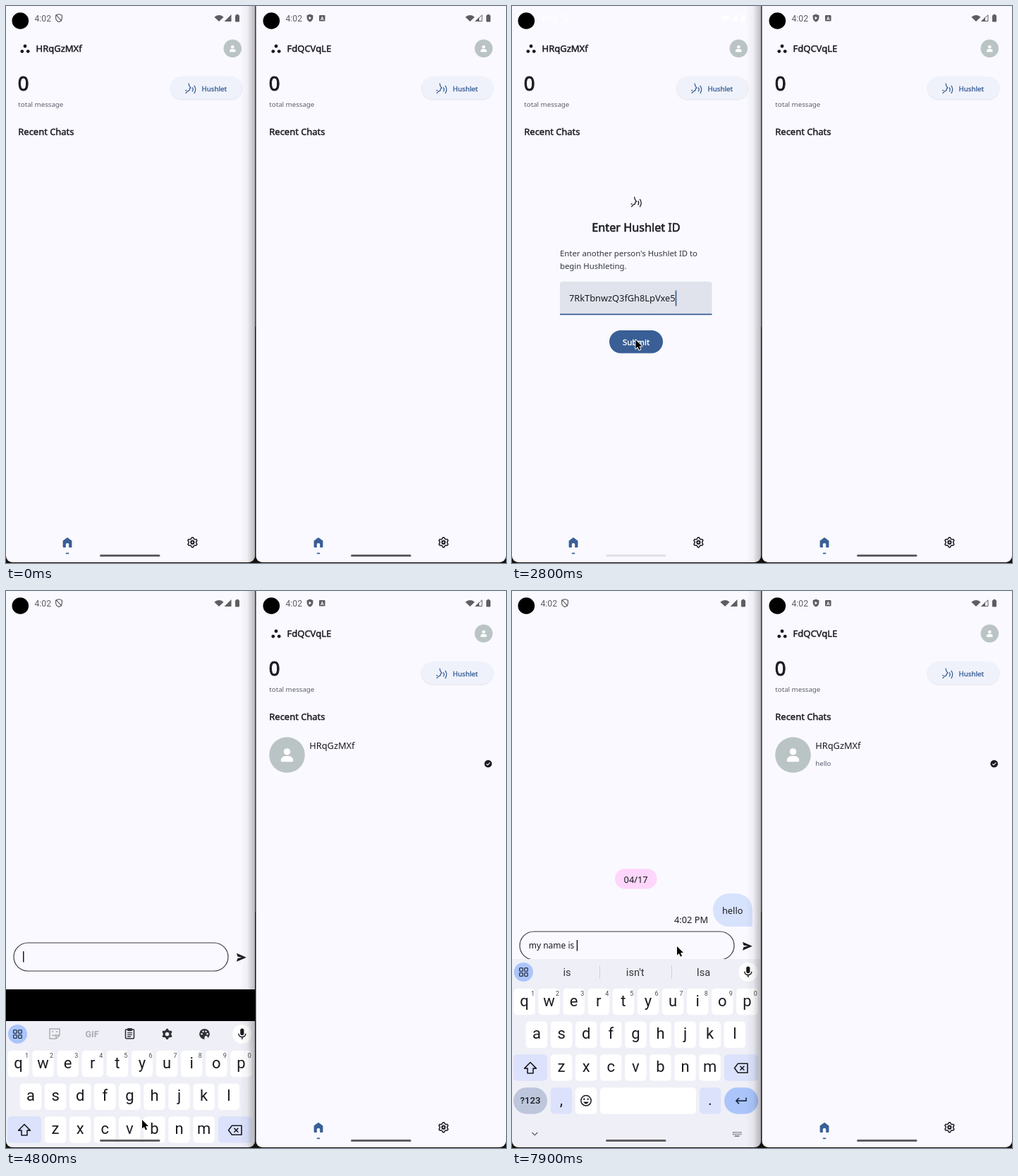
Animation of 709x790 px, one loop 8000 ms. Source, as an HTML page with a canvas:

```html
<!DOCTYPE html>
<html lang="en">
<head>
<meta charset="utf-8">
<title>Two phones chatting</title>
<style>
  html, body { margin: 0; width: 100%; height: 100%; overflow: hidden; background: #15110c; }
  canvas { display: block; width: 709px; height: 790px; }
</style>
</head>
<body>
<canvas id="stage"></canvas>
<script>
const W = 709, H = 790, LOOP = 8000, TICK = 100, RIGHT = 356;
const PAGE = '#f9f9ff', INK = '#1a1b20', BLUE = '#395f96', GREY = '#5c5e6b';
const ACCENT = '#abc5fb', SOFT = '#dce2fb', KEYS_BG = '#efeff7', STATUS = '#5e5e62';
const NOTO = '"Noto Sans", sans-serif', ROBOTO = 'Roboto, sans-serif';
const LEFT_ID = 'HRqGzMXf', RIGHT_ID = 'FdQCVqLE', APP = 'Hushlet';
const KB_TOP = 522, KB_H = H - KB_TOP;

const canvas = document.getElementById('stage');
const c = canvas.getContext('2d');
const dpr = window.devicePixelRatio || 1;
canvas.width = W * dpr;
canvas.height = H * dpr;

// Drawing helpers; "medium" thickens the regular weight with a thin outline
function text(s, x, y, size, { color = INK, weight = 400, font = NOTO, align = 'left', medium = false } = {}) {
  c.font = `${weight} ${size}px ${font}`;
  c.fillStyle = color;
  c.textAlign = align;
  c.fillText(s, x, y);
  if (medium) {
    c.strokeStyle = color;
    c.lineWidth = size * 0.035;
    c.strokeText(s, x, y);
  }
}
function box(x, y, w, h, r, color) {
  c.beginPath();
  c.roundRect(x, y, w, h, r);
  c.fillStyle = color;
  c.fill();
}
function frame(x, y, w, h, r, color, width = 1.2) {
  c.beginPath();
  c.roundRect(x, y, w, h, r);
  line(color, width);
}
function disc(x, y, r, color) {
  c.beginPath();
  c.arc(x, y, r, 0, Math.PI * 2);
  c.fillStyle = color;
  c.fill();
}
function ring(x, y, r, color, width = 1.4) {
  c.beginPath();
  c.arc(x, y, r, 0, Math.PI * 2);
  line(color, width);
}
function line(color, width) {
  c.strokeStyle = color;
  c.lineWidth = width;
  c.stroke();
}
function at(x, y, scale, draw) {
  c.save();
  c.translate(x, y);
  c.scale(scale, scale);
  draw();
  c.restore();
}
function shape(d, x, y, color, { scale = 1, width = 0 } = {}) {
  at(x, y, scale, () => {
    const p = new Path2D(d);
    if (width) {
      c.strokeStyle = color;
      c.lineWidth = width;
      c.stroke(p);
    } else {
      c.fillStyle = color;
      c.fill(p, 'evenodd');
    }
  });
}

// Icons
function gear(x, y, r, color, filled) {
  c.beginPath();
  for (let i = 0; i < 24; i++) {
    const a = (i - 1.5) * Math.PI / 12 - Math.PI / 2;
    const q = i % 4 === 1 || i % 4 === 2 ? r : r * 0.76;
    c.lineTo(x + q * Math.cos(a), y + q * Math.sin(a));
  }
  c.closePath();
  if (filled) {
    c.fillStyle = color;
    c.fill();
    disc(x, y, r * 0.36, KEYS_BG);
  } else {
    line(color, 1.5);
    ring(x, y, r * 0.3, color, 2);
  }
}
function person(x, y, r, s) {
  disc(x, y, r, '#bac4c4');
  disc(x, y - 4.6 * s, 4.7 * s, '#fff');
  box(x - 8.8 * s, y + 1.4 * s, 17.6 * s, 8.4 * s, [8 * s, 8 * s, 2 * s, 2 * s], '#fff');
}
function voice(x, y, color) {
  shape('M-2.8 -7.3C-1.6 -6.4 -2.4 -4.6 -1.5 -3.4L.6 -.7L-1.2 .3C-1.4 2.4 -1 3.8 -3.4 3.7C-5.6 3.6 -4.6 6.4 -7 6.7M-7.3 3.2L-5.6 2.4M2.6 -1.5Q4.8 1.4 2.6 4.4M5.2 -4.2Q9.4 1.4 5.2 7',
    x, y, color, { width: 1.3 });
}
function status(dx, color) {
  disc(20.3 + dx, 21, 11.8, '#000');
  text('4:02', 40.5 + dx, 21.5, 12.2, { color, font: ROBOTO });
  const shield = 'M0 -5.5L4.4 -3.7V-.4C4.4 2.6 2.5 4.8 0 5.6C-2.5 4.8 -4.4 2.6 -4.4 -.4V-3.7Z';
  if (dx) {
    shape(shield + 'M-1.4 -2.3V2.5L2.2 .1Z', 431, 17, color);
    box(444, 13, 8.5, 8.5, 1, color);
    text('A', 448.3, 20, 7, { color: PAGE, weight: 700, font: ROBOTO, align: 'center' });
  } else {
    shape(shield + 'M-4.2 -4.6L4 4.4', 75, 17, color, { width: 1.2 });
  }
  c.beginPath();
  c.moveTo(302 + dx, 22);
  c.arc(302 + dx, 22, 9, -Math.PI * 0.76, -Math.PI * 0.24);
  c.fillStyle = color;
  c.fill();
  if (dx) {
    shape('M1 9.5H10V.8Z', 665, 12, color, { width: 1 });
    shape('M0 10H6V4Z', 665, 12, color);
  } else {
    shape('M0 10H10V0Z', 309.5, 12, color);
  }
  box(325 + dx, 13, 6, 9.4, 1, color);
  box(326.5 + dx, 11.8, 3, 2, 0, color);
}

// Screens
function home(dx, own, peer, preview) {
  for (const [x, y] of [[27, 57], [22.8, 64.3], [31.2, 64.3]]) disc(x + dx, y, 2.4, INK);
  text(own, 42.5 + dx, 65, 13, { medium: true });
  person(321.3 + dx, 60.3, 12.7, 0.5);
  text('0', 16.8 + dx, 120, 27.5, { medium: true });
  text('total message', 17.3 + dx, 143, 9.7, { color: GREY });

  c.save();
  c.shadowColor = 'rgba(40,50,90,.16)';
  c.shadowBlur = 1.6 * dpr;
  c.shadowOffsetY = 0.5 * dpr;
  box(233.3 + dx, 100.5, 101.4, 32, 16, '#f0f2fb');
  c.restore();
  voice(261.5 + dx, 117, BLUE);
  text(APP, 277.5 + dx, 121, 9.8, { color: BLUE, medium: true });
  text('Recent Chats', 17.3 + dx, 183, 12.95, { medium: true });

  if (peer) {
    person(42.5 + dx, 232.5, 25.3, 1);
    text(peer, 74.3 + dx, 224, 12.8);
    if (preview) text(preview, 74.3 + dx, 248, 9.6, { color: GREY });
    disc(327.7 + dx, 245, 5.3, INK);
    shape('M-2.5 .1L-.7 1.9L2.6 -1.6', 327.7 + dx, 245, PAGE, { width: 1.1 });
  }
  shape('M0 -7.2L6.4 -2.4V6Q6.4 7 5.4 7H2.2V2.4Q2.2 .8 0 .8T-2.2 2.4V7H-5.4Q-6.4 7 -6.4 6V-2.4Z', 87 + dx, 761, BLUE);
  box(84.7 + dx, 775.6, 4.6, 1.7, 0.8, BLUE);
  gear(264.4 + dx, 760.7, 7, INK);
}
function indicator(dx, color) {
  box(133 + dx, 778, 85.5, 3, 1.5, color);
}
function dialog(shift, pasted) {
  c.save();
  c.translate(0, shift);
  box(49.5, 160, 252, 255, 14, PAGE);
  voice(176, 178, INK);
  text(`Enter ${APP} ID`, 176, 220, 16.2, { medium: true, align: 'center' });
  text(`Enter another person's ${APP} ID to`, 68, 254.7, 11.35, { color: '#33353d' });
  text('begin Hushleting.', 68, 273.3, 11.35, { color: '#33353d' });
  box(68, 291, 215.5, 47, [4, 4, 0, 0], '#e0e2ec');
  box(68, 336.4, 215.5, 1.8, 0, BLUE);
  if (pasted) {
    text('7RkTbnwzQ3fGh8LpVxe5', 81, 319, 12.8);
    box(81 + c.measureText('7RkTbnwzQ3fGh8LpVxe5').width, 303.5, 1.7, 22, 0, BLUE);
  } else {
    box(80.8, 303.5, 1.7, 22, 0, BLUE);
  }
  box(138, 360, 76, 32.4, 16.2, BLUE);
  text('Submit', 176, 381, 11.4, { color: '#fff', medium: true, align: 'center' });
  c.restore();
}
function chat(draft, sent, top, bottom) {
  if (bottom < H) {
    c.fillStyle = '#000';
    c.fillRect(0, bottom, 353, H - bottom);
  }
  if (sent) {
    box(146, 394, 59.5, 28.5, 14, '#ffd6fb');
    text('04/17', 175.6, 414, 12.8, { align: 'center' });
    text('4:02 PM', 230, 471, 12.8);
    box(285, 429, 55.8, 47, [23, 23, 2, 23], '#d7e2fd');
    text('hello', 312.7, 458.3, 12.8, { align: 'center' });
  }
  frame(11, top, 304, 40, 20, '#3a3b40');
  text(draft, 23.7, top + 24, 12);
  box(24 + c.measureText(draft).width, top + 12, 1.5, 15.5, 0, INK);
  shape('M-6.6 -6L7.2 0L-6.6 6L-5.2 1.3L1 0L-5.2 -1.3Z', 333.6, top + 20.8, INK);
}

// Keyboard, laid out at its resting place
function key(x, y, w, label, color = '#fff', r = 5) {
  box(x - w / 2, y, w, 37.5, r, color);
  if (label) text(label, x, y + 24.8, 22, { font: ROBOTO, align: 'center' });
}
function toolbar() {
  const dim = '#adadb2';
  shape('M-7 -7H7V2L2 7H-7ZM2 7V2H7M-3.4 1.2Q-1 4.2 2 1', 69, 540, dim, { width: 1.5 });
  disc(66.3, 537, 1.1, dim);
  disc(72, 537, 1.1, dim);
  text('GIF', 122, 545, 12.5, { color: dim, weight: 700, font: ROBOTO, align: 'center' });
  clipboard(175.5, 540, 1);
  gear(228.5, 540.4, 7.6, '#303136', true);
  disc(281.5, 540.3, 7.4, '#303136');
  for (const [x, y] of [[-4, 0], [-2, -3.5], [2, -3.5], [4, 0]]) disc(281.5 + x, 540.3 + y, 1.2, KEYS_BG);
  box(281.5, 543, 4.5, 6, 2, KEYS_BG);
}
function clipboard(x, y, s) {
  at(x, y, s, () => {
    frame(-6, -6.2, 12, 13, 1.2, '#303136', 1.6);
    box(-3.4, -8, 6.8, 4.2, 1, '#303136');
    shape('M-3.4 -1.4H3.4M-3.4 1.3H3.4M-3.4 4H1.5', 0, 0, '#303136', { width: 1.3 });
  });
}
function keyboard(offset, top, isDialog) {
  c.save();
  c.translate(0, offset);
  c.fillStyle = KEYS_BG;
  c.fillRect(0, KB_TOP, 353, KB_H + 2);

  disc(16.4, 540.4, 13.5, ACCENT);
  for (const x of [10.6, 17.6]) for (const y of [534.6, 541.6]) frame(x, y, 4.7, 4.7, 1, '#26324a', 1.3);
  disc(334.8, 540.4, 13.5, '#fff');
  box(332.2, 532.5, 5.2, 9.6, 2.6, INK);
  shape('M-5 -.5C-5 6 5 6 5 -.5M0 4.5V7.5', 334.8, 540.2, INK, { width: 1.5 });

  if (top === 'clip') {
    box(112.5, 528, 126, 25, 6, '#f9f9fe');
    clipboard(124, 540.5, 0.84);
    text('7RkTbnwzQ3fG...', 135, 544.7, 11.5, { font: ROBOTO, weight: 500 });
  } else if (top) {
    top.split(' ').forEach((w, i) => {
      text(w, 78 + 96.7 * i, 545.6, 14.6, { color: '#34353a', font: ROBOTO, align: 'center' });
    });
    for (const x of [124, 226]) box(x, 531, 1, 19, 0, '#cfd0d8');
  } else {
    toolbar();
  }

  const step = 35.1;
  [...'qwertyuiop'].forEach((ch, i) => {
    const x = 17.5 + step * i;
    key(x, 563.7, 30.4, ch);
    text((i + 1) % 10, x + 12, 574.3, 9, { color: '#46474d', font: ROBOTO, align: 'center' });
  });
  [...'asdfghjkl'].forEach((ch, i) => key(35 + step * i, 610.5, 30.4, ch));
  [...'zxcvbnm'].forEach((ch, i) => key(70 + step * i, 657.3, 30.4, ch));
  key(26, 657.3, 48, '', SOFT);
  key(325, 657.3, 48, '', SOFT);
  shape('M0 -8L8.4 .6H4V7.5H-4V.6H-8.4Z', 26, 676.5, INK, { width: 1.6 });
  shape('M-9.5 0L-4.6 -6.5H9V6.5H-4.6ZM-1.6 -3L4.4 3M4.4 -3L-1.6 3', 325, 676.7, INK, { width: 1.6 });

  key(26, 704.2, 48, '', '#bec6dc', 18.7);
  text('?123', 26, 727.4, 13.2, { font: ROBOTO, weight: 500, align: 'center' });
  key(70, 704.2, 30.4, ',', SOFT);
  key(105, 704.2, 30.4, '');
  ring(105, 722.8, 7.2, INK, 1.5);
  disc(102.3, 720.8, 1.2, INK);
  disc(107.7, 720.8, 1.2, INK);
  shape('M-3.8 1.6Q0 7.6 3.8 1.6Z', 105, 722.8, INK);
  key(193, 704.2, 136, '');
  key(281, 704.2, 30.4, '.', SOFT);
  key(325, 704.2, 48, '', ACCENT, 18.7);
  const enter = isDialog ? 'M-6.6 .4L-2.2 4.8L6.8 -4.4' : 'M7 -4.2V.4H-7M-3 -3.8L-7.2 .4L-3 4.6';
  shape(enter, 325, 722.8, '#1d2c48', { width: 1.7 });

  shape('M-3.8 -2L0 1.8L3.8 -2', 32.3, 770, '#55565c', { width: 1.2 });
  for (let i = 0; i < 10; i++) box(313 + 2.7 * (i % 5), 767 + 2.7 * Math.floor(i / 5), 1.5, 1.5, 0, '#55565c');
  box(315.5, 772.4, 7, 1.4, 0, '#55565c');
  c.restore();
}

// Timeline: [time, x, y] for the pointer; [time, draft, suggestions] for typing
const POINTER = [
  [100, 300, 612], [400, 290, 420], [600, 290, 420], [1100, 280, 116], [1400, 280, 116],
  [1800, 170, 434], [2000, 170, 434], [2300, 172, 530], [2500, 172, 530], [2900, 176, 463],
  [3400, 176, 463], [4000, 200, 228], [4200, 200, 228], [4600, 193, 750], [6200, 193, 750],
  [6500, 205, 702], [7000, 234, 504], [8000, 234, 504]
];
const TYPING = [
  [0, '', ''], [5200, 'b', 'b be but'], [5300, 'be', 'be because best'], [5500, 'b', 'b be but'],
  [5600, '', ''], [5700, 'h', 'h he how'], [5900, 'he', 'he her hey'], [6100, 'hel', 'help hello held'],
  [6300, 'hell', 'hell hello hells'], [6400, 'hello', 'hello hellos Hello'], [6700, '', ''],
  [7300, 'm', 'm my me'], [7400, 'my', 'my mystery myself'], [7500, 'my n', 'n name new'],
  [7600, 'my nam', 'nam name names'], [7700, 'my name ', 'is and on'], [7800, 'my name i', 'i is in'],
  [7900, 'my name is ', "is isn't Isa"]
];

function pointer(t) {
  if (t < POINTER[0][0]) return;
  const i = POINTER.findIndex(p => p[0] > t);
  const [t0, x0, y0] = POINTER[i - 1], [t1, x1, y1] = POINTER[i];
  const p = (t - t0) / (t1 - t0), e = p * p * (3 - 2 * p);
  const arrow = 'M0 0V12.6L2.9 9.9L4.9 14.4L7 13.4L5.1 9.1H9Z';
  const x = x0 + (x1 - x0) * e, y = y0 + (y1 - y0) * e;
  shape(arrow, x, y, '#fff', { width: 1.8 });
  shape(arrow, x, y, '#000');
}

// How far the keyboard sits below its resting place
function keyboardOffset(t) {
  if (t >= 5100) return 0;
  if (t >= 4800) return 88 * 0.22 ** ((t - 4800) / 100);
  if (t >= 2500) return KB_H * Math.min(1, (t - 2500) / 300);
  return KB_H * (1 - Math.min(1, Math.max(0, (t - 1400) / 400))) ** 3;
}

function phone(x, w, draw) {
  c.save();
  c.beginPath();
  c.roundRect(x, -10, w, H + 9, [0, 0, 9, 9]);
  c.clip();
  c.fillStyle = PAGE;
  c.fillRect(x, 0, w, H);
  draw();
  c.restore();
}

function leftPhone(t) {
  const inDialog = t >= 1300 && t < 3000, inChat = t >= 4300;
  const k = keyboardOffset(t);
  const [, draft, words] = TYPING.findLast(s => s[0] <= t);
  if (inChat) {
    const open = t >= 4800, rest = k / 88;
    chat(draft, t >= 6700, open ? 483 + 16 * rest : 724, open ? KB_TOP + 43 * rest : H);
  } else {
    home(0, LEFT_ID, t >= 3200 && RIGHT_ID);
    if (inDialog) dialog(100 * k / KB_H, t >= 2300);
  }
  status(0, inDialog ? '#fff' : STATUS);
  if (k < KB_H) keyboard(k, inChat ? words : t < 2300 ? 'clip' : '', !inChat);
  indicator(0, inDialog ? '#e2e1e9' : '#5f5f63');

  const shade = c.createLinearGradient(331, 0, 353, 0);
  shade.addColorStop(0, 'rgba(0,0,0,0)');
  shade.addColorStop(0.5, 'rgba(0,0,0,.045)');
  shade.addColorStop(1, 'rgba(0,0,0,.26)');
  c.fillStyle = shade;
  c.fillRect(331, 0, 22, H);
}

function render(now) {
  const t = Math.floor((now % LOOP) / TICK) * TICK;
  c.setTransform(dpr, 0, 0, dpr, 0, 0);
  c.lineJoin = 'round';
  c.fillStyle = '#15110c';
  c.fillRect(0, 0, W, H);
  c.fillStyle = '#3a3a3c';
  c.fillRect(353, 0, 1.3, 455);
  phone(0, 353, () => leftPhone(t));
  phone(354.3, 354.7, () => {
    home(RIGHT, RIGHT_ID, t >= 3400 && LEFT_ID, t >= 6900 && 'hello');
    status(RIGHT, STATUS);
    indicator(RIGHT, '#5f5f63');
  });
  pointer(t);
}

const start = performance.now();
function loop() {
  render(performance.now() - start);
  requestAnimationFrame(loop);
}
loop();
</script>
</body>
</html>
```
